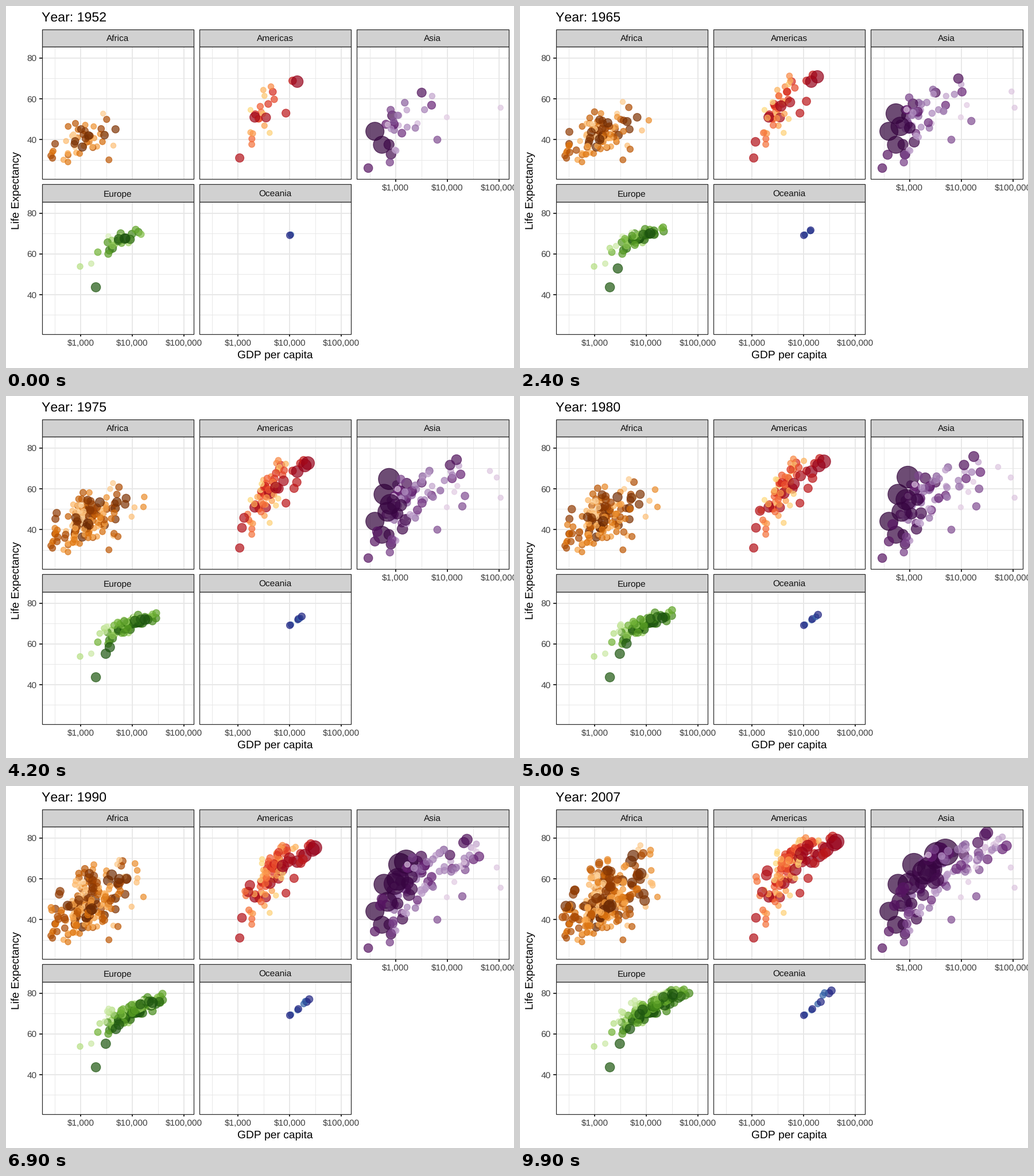
A matplotlib script that plays this animation: 885x632 px, repeating every 10000 ms.

```python
import matplotlib.pyplot as plt
import numpy as np
from matplotlib.animation import FuncAnimation
from matplotlib.colors import LinearSegmentedColormap, to_rgb
from matplotlib.patches import Rectangle

W, H, FRAMES, TRAIL = 885, 632, 100, 30
PT = 0.72                     # points per pixel at 100 dpi
PANEL_W, PANEL_H, STRIP_H = 264.6, 230.8, 30.4
COLS, ROWS = (62.5, 336.7, 610.9), (71, 341.8)
DECADE, YEAR_PX = 90, 3.557   # pixels per tenfold income and per year of life

plt.rcParams.update({"font.family": "Liberation Sans", "text.hinting": "none",
                     "text.kerning_factor": 6})
progress = np.arange(FRAMES) / (FRAMES - 1)


def tone(color):
    """Colour as shown with the darker 1.8 display gamma."""
    return np.array(to_rgb(color)) ** 1.222


GRID, EDGE, TICK, STRIP = map(tone, ("#ebebeb", "#333333", "#4d4d4d", "#d9d9d9"))

# cloud: mean and spread of log10 income, mean and spread of life expectancy,
# at evenly spaced times; paths: (income, life) stops of notable countries
# by population rank, evenly spaced in time
REGIONS = {
    "Africa": dict(
        cell=(0, 0), n=52, pop=135, fall=0.2, growth=3.9, corr=0.5, seed=4,
        colors=["#7f3b08", "#b35806", "#e08214", "#fdb863", "#fee0b6"],
        cloud=[(2.96, 0.27, 38.8, 4.8), (3.1, 0.31, 45, 5.6),
               (3.14, 0.34, 53, 7), (3.17, 0.39, 54.5, 8.5)],
        paths={0: [(1077, 36.3), (1450, 44), (2014, 46.9)],
               1: [(1419, 41.9), (1950, 50.5), (3850, 61), (5581, 71.3)],
               3: [(781, 39.1), (895, 45.3), (600, 46.8), (278, 46.5)],
               4: [(4725, 45), (7550, 53.1), (7650, 61.2), (9270, 49.3)],
               19: [(3521, 30), (5480, 37.2), (2500, 40.2), (4797, 42.7)],
               32: [(2388, 42.7), (19900, 51.9), (11200, 66.8), (12057, 74)],
               44: [(4293, 37), (10500, 47.2), (12500, 60.6), (13206, 56.7)],
               47: [(2719, 52.7), (7670, 76.4)]}),
    "Americas": dict(
        cell=(1, 0), n=25, pop=301, fall=0.7, growth=2.3, corr=0.55, seed=2,
        colors=["#a50026", "#d73027", "#f46d43", "#fdae61", "#fee090"],
        cloud=[(3.48, 0.2, 52.5, 8), (3.65, 0.21, 60.5, 7.2),
               (3.73, 0.21, 68.3, 5.2), (3.86, 0.25, 73.4, 3.6)],
        paths={0: [(13990, 68.4), (42952, 78.2)],
               1: [(2109, 50.9), (6400, 62.3), (9066, 72.4)],
               2: [(3478, 50.8), (8700, 66.2), (11978, 76.2)],
               5: [(11367, 68.8), (36319, 80.7)],
               14: [(1840, 37.6), (1202, 60.9)],
               20: [(3082, 64.3), (10000, 73.6), (19329, 78.7)]}),
    "Asia": dict(
        cell=(2, 0), n=33, pop=320, fall=0.2, growth=2.6, corr=0.65, seed=3,
        giants=(1319, 1110),
        colors=["#40004b", "#762a83", "#9970ab", "#c2a5cf", "#e7d4e8"],
        cloud=[(3.08, 0.31, 47, 8), (3.35, 0.38, 56, 8),
               (3.66, 0.46, 65, 6.5), (3.85, 0.46, 70.5, 5.5)],
        paths={0: [(400, 44), (510, 49.5), (705, 64.5), (1200, 66.8),
                   (2200, 70), (4959, 73)],
               1: [(547, 37.4), (715, 49.8), (1030, 59.2), (2452, 64.7)],
               2: [(750, 37.5), (1400, 54.5), (3541, 70.7)],
               5: [(3217, 63), (12900, 72.5), (23500, 78.9), (31656, 82.6)],
               12: [(779, 28.8), (975, 43.8)],
               14: [(6460, 39.9), (22000, 52.5), (22500, 67), (21655, 72.8)],
               31: [(108382, 55.6), (90000, 66.5), (31000, 74.6), (47307, 77.6)],
               32: [(9867, 50.9), (29796, 75.6)]}),
    "Europe": dict(
        cell=(0, 1), n=30, pop=82, fall=0.1, growth=1.3, corr=0.75, seed=5,
        colors=["#276419", "#4d9221", "#7fbc41", "#b8e186", "#e6f5d0"],
        cloud=[(3.71, 0.19, 65.9, 3.3), (3.99, 0.18, 70.4, 1.8),
               (4.17, 0.19, 73.8, 2.3), (4.34, 0.22, 77.8, 2.4)],
        paths={0: [(7144, 67.5), (20500, 72.7), (32170, 79.4)],
               1: [(1969, 43.6), (3200, 56.3), (5250, 63.8), (8458, 71.8)],
               17: [(14734, 69.6), (27000, 75.4), (37506, 81.7)],
               23: [(974, 53.8), (2550, 66.2), (3800, 71.4), (7446, 74.9)],
               26: [(1601, 55.2), (3100, 67.1), (3300, 71.9), (5937, 76.4)]}),
    "Oceania": dict(
        cell=(1, 1), n=2, pop=20, fall=0.7, growth=2.2, corr=0, seed=1,
        colors=["#313695", "#4575b4"], cloud=[(4, 0, 70, 0)],
        paths={0: [(10040, 69.1), (18800, 74.2), (34435, 81.2)],
               1: [(10557, 69.4), (17200, 73.2), (25185, 80.2)]}),
}


def along(stops):
    """Values over all frames through evenly timed stops."""
    return np.interp(progress, np.linspace(0, 1, len(stops)), stops)


def tracks(n, cloud, corr, paths, rng):
    """Log income and life of each country, both shaped (frames, countries)."""
    z = np.clip(rng.normal(size=(2, n)), -1.9, 1.9)
    z = (z - z.mean(axis=1, keepdims=True)) / z.std(axis=1, keepdims=True)
    z_life = corr * z[0] + np.sqrt(1 - corr ** 2) * z[1]
    m_inc, s_inc, m_life, s_life = np.array(cloud).T
    income, life = [], []
    for k in range(n):
        if k in paths:
            inc, age = np.array(paths[k]).T
            inc = np.log10(inc)
        else:
            inc = m_inc + s_inc * z[0, k] + rng.normal(0, 0.04, len(m_inc))
            age = m_life + s_life * z_life[k] + rng.normal(0, 0.8, len(m_inc))
        income.append(along(inc))
        life.append(along(age))
    return np.array(income).T, np.array(life).T


def diameters(n, top, fall, growth, giants):
    """Point width in pixels, area growing with population."""
    rank = np.arange(n)
    pop = top * (1 - rank / n) ** 1.5 / (1 + fall * rank)
    pop[:len(giants)] = giants
    pop = pop * growth ** (progress[:, None] - 1)
    size = 2 + 10 * np.sqrt(pop / 1319)
    return 0.75 * 1.75 * (2.845 * size + 0.945)


fig = plt.figure(figsize=(W / 100, H / 100), dpi=100, facecolor="white")
ax = fig.add_axes([0, 0, 1, 1])
ax.set(xlim=(0, W), ylim=(H, 0))
ax.axis("off")


def label(x, y, s, px, color="black", **kw):
    kw = {"ha": "center", "va": "baseline", **kw}
    return ax.text(x, y, s, fontsize=px * PT, color=color, **kw)


def line(xs, ys, px, color, z):
    ax.plot(xs, ys, color=color, lw=px * PT, zorder=z, solid_capstyle="butt")


def box(x, y, h, **kw):
    patch = Rectangle((x, y), PANEL_W, h, lw=1.2 * PT, ec=EDGE, **kw)
    return ax.add_patch(patch)


def draw_frame(name, left, top, x1000, y80, x_axis, y_axis):
    """Grid, strip, border and axis labels of one panel."""
    right, bottom = left + PANEL_W, top + PANEL_H
    for half in range(-1, 5):
        x = x1000 + DECADE * half / 2
        major = half % 2 == 0
        line([x, x], [top, bottom], 1.87 if major else 0.93, GRID, 1 + major / 10)
        if major and x_axis:
            line([x, x], [bottom, bottom + 4.8], 1.87, EDGE, 6)
            label(x, bottom + 20.4, f"${10 ** (3 + half // 2):,}", 15.4, TICK)
    for age in range(80, 20, -10):
        y = y80 + YEAR_PX * (80 - age)
        major = age % 20 == 0
        line([left, right], [y, y], 1.87 if major else 0.93, GRID, 1 + major / 10)
        if major and y_axis:
            line([left - 4.8, left], [y, y], 1.87, EDGE, 6)
            label(left - 8.7, y + 5.6, str(age), 15.4, TICK, ha="right")
    box(left, top - STRIP_H, STRIP_H, fc=STRIP, zorder=5)
    box(left, top, PANEL_H, fc="none", zorder=6)
    label((left + right) / 2, top - 9, name, 15.4, tone("#1a1a1a"), zorder=7)


class Panel:
    def __init__(self, name, cell, n, pop, fall, growth, corr, seed, colors,
                 cloud, paths, giants=()):
        left, top = COLS[cell[0]], ROWS[cell[1]]
        x1000, y80 = left + 67.6, top + 19.75
        draw_frame(name, left, top, x1000, y80,
                   x_axis=cell != (0, 0) and cell != (1, 0), y_axis=cell[0] == 0)

        rng = np.random.default_rng(seed)
        income, life = tracks(n, cloud, corr, paths, rng)
        head = n // 6
        order = np.r_[0:head, head + rng.permutation(n - head)]
        if not giants:
            order = order[::-1]          # large points on top
        self.x = (x1000 + DECADE * (income - 3))[:, order]
        self.y = (y80 + YEAR_PX * (80 - life))[:, order]
        width = diameters(n, pop, fall, growth, giants)
        self.area = ((width * PT) ** 2)[:, order]
        ramp = LinearSegmentedColormap.from_list(name, [tone(c) for c in colors])
        self.rgba = ramp(np.linspace(0, 1, n), alpha=0.7)[order]
        self.dots = ax.scatter([], [], lw=1.24 * PT, zorder=3)
        self.dots.set_clip_path(Rectangle((left, top), PANEL_W, PANEL_H,
                                          transform=ax.transData))

    def show(self, marks):
        self.dots.set_offsets(np.c_[self.x[marks].ravel(), self.y[marks].ravel()])
        self.dots.set_sizes(self.area[marks].ravel())
        rgba = np.tile(self.rgba, (len(marks), 1))
        self.dots.set_facecolor(rgba)
        self.dots.set_edgecolor(rgba)


panels = [Panel(name, **spec) for name, spec in REGIONS.items()]
title = label(62, 26.3, "", 23.1, ha="left")
label(469, 614.8, "GDP per capita", 19.25)
label(27.5, 322, "Life Expectancy", 19.25, rotation=90, ha="right", va="center")


def update(i):
    marks = [*range(0, i, TRAIL), i]     # earlier positions stay visible
    title.set_text(f"Year: {round(1952 + 55 * progress[i])}")
    for p in panels:
        p.show(marks)
    return [title, *(p.dots for p in panels)]


anim = FuncAnimation(fig, update, frames=FRAMES, init_func=lambda: update(0),
                     interval=100, repeat=True, repeat_delay=0)
plt.show()
```
